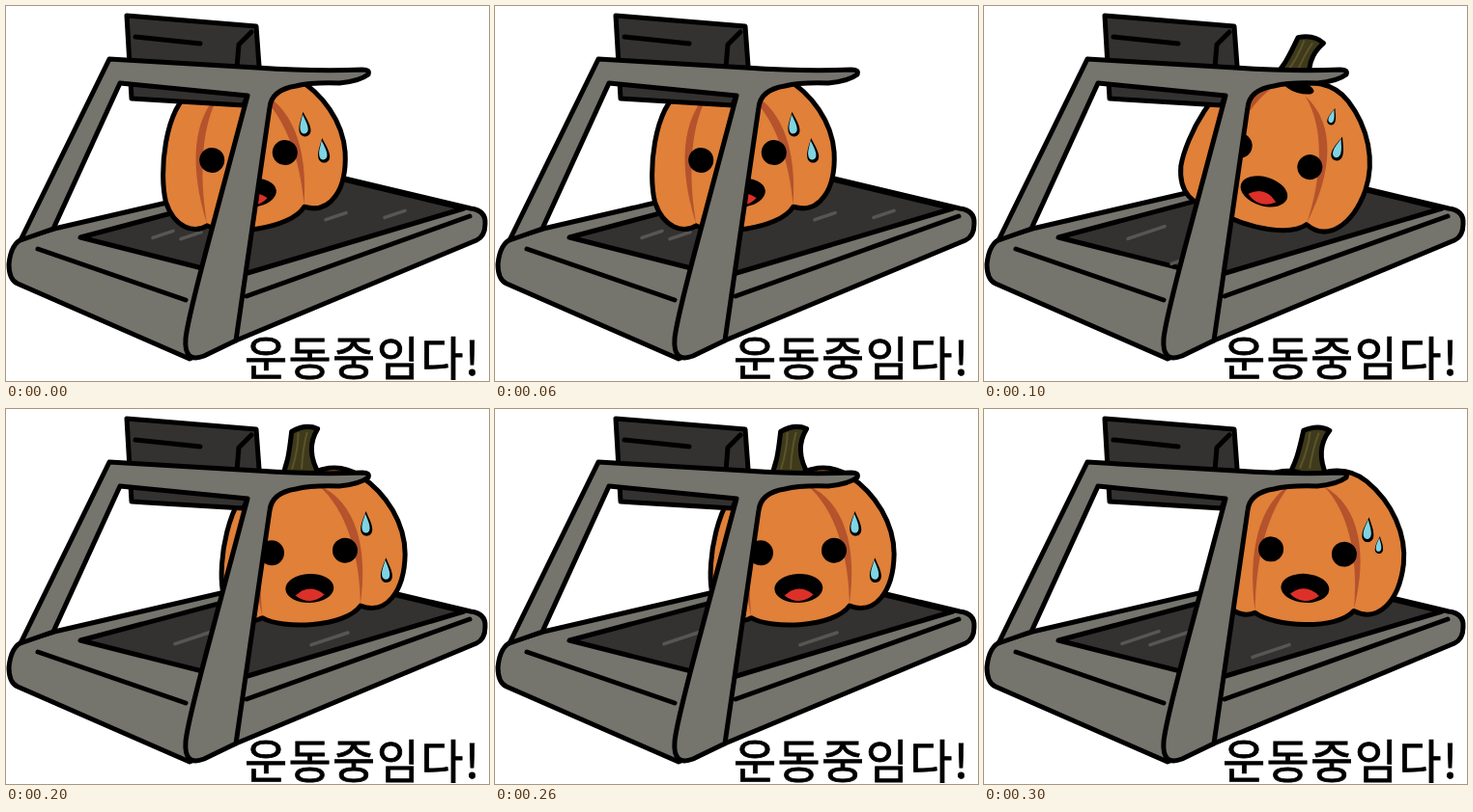
An HTML page for the animation above (400 ms loop, 500 px wide and 389 px high).

```html
<!DOCTYPE html>
<html lang="ko">
<head>
<meta charset="utf-8">
<title>운동중임다!</title>
<style>
html, body { margin: 0; width: 100%; height: 100%; overflow: hidden; background: #fff; }
svg { display: block; width: 500px; height: 389px; }
.ink { stroke: #000; stroke-width: 5; stroke-linejoin: round; stroke-linecap: round; }
.steel { fill: #75746d; }
.dark { fill: #333230; }
.line { fill: none; }
text { font: 500 48px "Noto Sans CJK KR", "Noto Sans CJK", sans-serif; letter-spacing: 1.4px; stroke: #000; stroke-width: 0.8; }
</style>
</head>
<body>
<svg viewBox="0 0 500 389">
  <defs>
    <path id="drop" d="M0 -13C3 -5 6 0 6 6C6 15 -6 15 -6 6C-6 0 -3 -5 0 -13Z"/>
    <g id="sweat">
      <use href="#drop"/>
      <use href="#drop" fill="#7fd4e3" transform="translate(-0.7 -0.3) scale(0.68 0.78)"/>
    </g>
  </defs>

  <!-- deck -->
  <path class="ink steel" d="M18 241L50 231L313 170L481 210Q497 212 496 226Q496 239 487 243L238 347L190 366L12 288Q3 284 3 268Q5 246 18 241Z"/>
  <path class="ink dark" d="M77 240L325 174L474 210L250 277L215 275Z"/>
  <path class="line" id="dashes" stroke="#575653" stroke-width="3.5" stroke-linecap="round"/>
  <path class="ink line" d="M33 252L186 305M249 301L480 218"/>

  <!-- pumpkin -->
  <g id="pumpkin">
    <path class="ink" fill="#3f3a1c" d="M-28 -72C-18 -90 -16 -105 -13 -125Q2 -133 14 -127C4 -112 6 -95 14 -80Z"/>
    <path class="line" stroke="#5c5429" stroke-width="2" d="M-14 -86Q-7 -105 -6 -124M-4 -86Q-2 -108 3 -124"/>
    <path class="ink" fill="#e08039" d="M0 -73C10 -88 36 -91 56 -77C84 -57 101 -25 100 6C98 45 78 69 52 58C35 80 -30 80 -50 67C-64 74 -84 66 -90 38C-94 8 -82 -58 -50 -75C-28 -86 -10 -84 0 -73Z"/>
    <ellipse cx="3" cy="-76" rx="16" ry="6"/>
    <path fill="#b4532c" d="M12 -69C52 -50 62 0 52 56C53 8 42 -42 12 -69ZM-22 -69C-54 -46 -62 5 -50 65C-53 8 -44 -40 -22 -69Z"/>
    <circle cx="-38" r="13"/>
    <circle cx="38" r="13"/>
    <ellipse cy="38" rx="25" ry="15"/>
    <path fill="#dc3028" d="M-15 45Q0 32 15 45Q8 51 0 51Q-8 51 -15 45Z"/>
    <use href="#sweat" x="61" y="-27"/>
    <use href="#sweat" id="falling"/>
  </g>

  <!-- monitor -->
  <path class="ink dark" d="M125 10L259 21L262 62L246 103L130 96Z"/>
  <path class="ink line" d="M134 32L201 39M239 64L241 40L254 27"/>

  <!-- frame -->
  <path class="ink steel" d="M107 55L260 64Q320 68 369 66Q377 66 375 71Q366 78 345 80Q316 79 300 83Q275 87 273 105L238 347L205 363Q184 371 186 345Q188 325 213 232L250 93L118 80L49 231L15 243Z"/>
  <text x="247" y="383">운동중임다!</text>
</svg>
<script>
const STEP = 100, STEPS = 4;
const $ = id => document.getElementById(id);

// hops: x, y, tilt of the face, and how far the second drop has run
const hops = [
  [251, 156, -6, 2],
  [301, 156, 17, -57],
  [313, 148, -2, 22],
  [335, 148, 4, -12]
];

// belt lanes: start x, height of the lane at x = 0, shift per step
const lanes = [
  [152, 291, -3],
  [181, 302, -3],
  [331, 332, -137],
  [392, 350, -38]
];

function dash([x, y, shift], i) {
  const length = i ? 38 : 21;
  const left = x + shift * i;
  return left < 100 ? "" : `M${left} ${y - left / 3}l${length} ${-length / 3}`;
}

function draw(time) {
  const i = Math.floor(time / STEP) % STEPS;
  const [x, y, tilt, run] = hops[i];
  $("pumpkin").setAttribute("transform", `translate(${x} ${y}) rotate(${tilt})`);

  // the drop follows the cheek and starts out small
  const cheek = 80 - 0.0056 * (run - 22) ** 2;
  $("falling").setAttribute("transform", `translate(${cheek} ${run}) scale(${run < 0 ? 0.7 : 1})`);

  // in the middle of the loop the lanes take turns
  const lit = lanes.filter((_, k) => i % 3 === 0 || (k + i) % 2);
  $("dashes").setAttribute("d", lit.map(lane => dash(lane, i)).join(""));
}

function tick() {
  draw(performance.now());
  requestAnimationFrame(tick);
}
tick();
</script>
</body>
</html>
```
